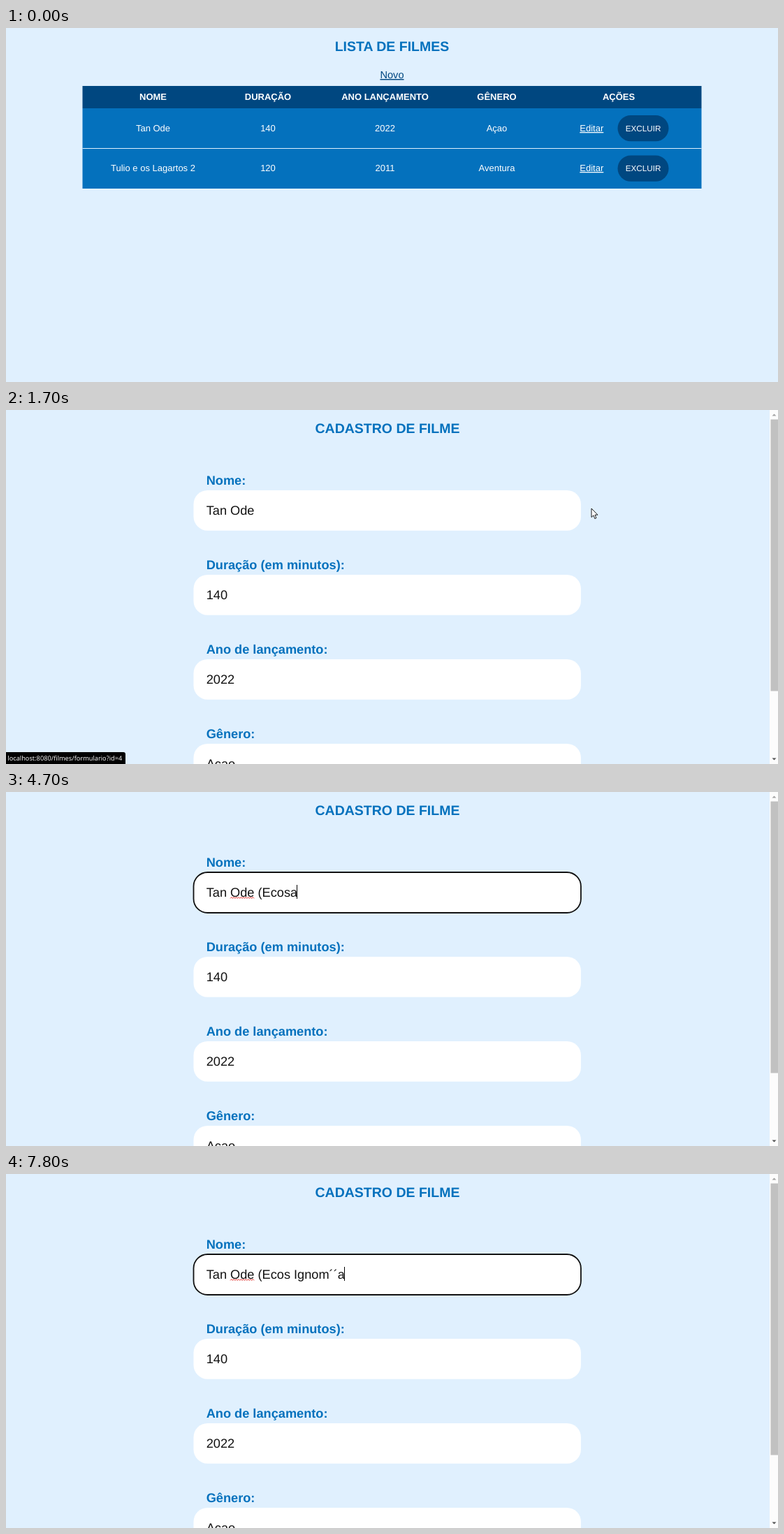
An HTML page that plays this animation: 1105x507 px, repeating every 8000 ms.

```html
<!DOCTYPE html>
<html lang="pt-BR">
<head>
<meta charset="utf-8">
<title>Lista de filmes</title>
<style>
  html, body { margin: 0; width: 100%; height: 100%; overflow: hidden; background: #e0f0fe; }
  svg { display: block; width: 1105px; height: 507px; }
  text { font: 13px "Liberation Sans", Arial, sans-serif; fill: #fff; white-space: pre; text-rendering: geometricPrecision; }
  .mid { text-anchor: middle; }
  .bold { font-weight: bold; }
  .title { font-size: 19.5px; fill: #0471bd; }
  .new { font-size: 14.6px; fill: #004780; }
  .link { text-decoration: underline; }
  .button { font-size: 11.7px; }
  .label { font-size: 18.2px; fill: #0471bd; }
  .value { font-size: 18.2px; fill: #111; }
  .status { font: 9.28px "Open Sans", "Noto Sans", sans-serif; }
  .squiggle { fill: none; stroke: #e5322d; stroke-width: 1; }
</style>
</head>
<body>
<svg id="stage" viewBox="0 0 1105 507">
  <rect width="1105" height="507" fill="#e0f0fe"/>
  <g id="list"></g>
  <g id="form"></g>
  <g id="status">
    <path d="M0 490H168Q171 490 171 493V507H0Z" fill="#000"/>
    <text id="url" class="status" x="2.3" y="502">localhost:8080/filmes/formulario?id=4</text>
  </g>
  <path id="arrow" d="M0 0V12.6L2.9 9.9 4.8 14.6 6.9 13.7 5 9.2H8.9Z" fill="#fff" stroke="#000" stroke-width=".9"/>
  <path id="beam" d="M0 0H2.2M3.2 0H5.4M2.7 .5V13M0 13.5H2.2M3.2 13.5H5.4" fill="none" stroke="#000"/>
</svg>
<script>
const LOOP = 8000;
const TEXT_X = 286.7;
const $ = id => document.getElementById(id);
const list = $("list"), form = $("form");

function add(parent, tag, attrs, content = "") {
  const node = document.createElementNS("http://www.w3.org/2000/svg", tag);
  for (const key in attrs) node.setAttribute(key, attrs[key]);
  node.textContent = content;
  return parent.appendChild(node);
}
const rect = (parent, x, y, width, height, fill, rx = 0) =>
  add(parent, "rect", { x, y, width, height, fill, rx });
const text = (parent, x, y, content, cls = "mid") =>
  add(parent, "text", { x, y, class: cls }, content);
const show = (node, visible) => node.style.display = visible ? "" : "none";

// Film list
const columns = [210.5, 375, 542.5, 702.5, 877];
text(list, 552.5, 33, "LISTA DE FILMES", "mid bold title");
text(list, 552.5, 72, "Novo", "mid new link");
rect(list, 109.5, 83, 886, 32, "#004780");
rect(list, 109.5, 115, 886, 115, "#0471bd");
rect(list, 109.5, 172, 886, 1, "#e0f0fe");
["NOME", "DURAÇÃO", "ANO LANÇAMENTO", "GÊNERO", "AÇÕES"]
  .forEach((name, i) => text(list, columns[i], 103, name, "mid bold"));
[
  ["Tan Ode", "140", "2022", "Açao"],
  ["Tulio e os Lagartos 2", "120", "2011", "Aventura"]
].forEach((cells, row) => {
  const y = 148 + row * 57;
  cells.forEach((cell, i) => text(list, columns[i], y, cell));
  text(list, 838.3, y, "Editar", "mid link");
  rect(list, 875.5, 125 + row * 57.5, 73, 37.3, "#004780", 18.6);
  text(list, 912, y, "EXCLUIR", "mid button");
});

// Film form
text(form, 546, 33, "CADASTRO DE FILME", "mid bold title");
const values = [
  ["Nome:", "Tan Ode"],
  ["Duração (em minutos):", "140"],
  ["Ano de lançamento:", "2022"],
  ["Gênero:", "Açao"]
].map(([label, value], i) => {
  const top = i * 121;
  text(form, TEXT_X, 107 + top, label, "bold label");
  rect(form, 268.5, 115 + top, 554.4, 57.7, "#fff", 20);
  return text(form, TEXT_X, 150 + top, value, "value");
});
const nameText = values[0];
const focus = add(form, "g", {});
add(focus, "rect", { x: 268.5, y: 115, width: 554.4, height: 58, rx: 20, fill: "none", stroke: "#111", "stroke-width": 1.8 });
const caret = rect(focus, 0, 133, 1, 20, "#000");
const squiggles = [0, 1].map(() => add(focus, "path", { class: "squiggle" }));

rect(form, 1093, 0, 12, 507, "#fcfcfc");
rect(form, 1094.5, 13.5, 10.5, 389, "#c1c1c1");
add(form, "path", { d: "M1096.5 8.5L1099.5 5.5 1102.5 8.5Z", fill: "#a3a3a3" });
add(form, "path", { d: "M1096.5 498.5L1099.5 501.5 1102.5 498.5Z", fill: "#505050" });

// Each step: start time, then its values
const pointer = [
  [0], [300, "arrow", 848, 6], [400, "arrow", 851, 130], [500, "arrow", 851, 195],
  [700, "arrow", 850, 188], [800, "arrow", 845, 164], [900, "arrow", 838, 141],
  [2100, "beam", 700, 142], [2200, "beam", 520, 140], [2300, "beam", 420, 138], [2500]
];
const status = [[0, 0], [700, .4], [800, .8], [900, 1], [1900, 0]];
const typing = [
  [0, ""], [3000, " "], [3400, " ("], [3900, " (E"], [4100, " (Ec"], [4200, " (Eco"],
  [4400, " (Ecos"], [4700, " (Ecosa"], [5200, " (Ecosa "], [5600, " (Ecosa"],
  [6200, " (Ecos"], [6400, " (Ecos "], [6700, " (Ecos I"], [6900, " (Ecos Ig"],
  [7100, " (Ecos Ign"], [7200, " (Ecos Igno"], [7300, " (Ecos Ignom"],
  [7700, " (Ecos Ignom´´"], [7800, " (Ecos Ignom´´a"]
];
const stepAt = (steps, time) => steps.findLast(step => step[0] <= time);

function underline(path, from, to) {
  const start = TEXT_X + nameText.getSubStringLength(0, from);
  const end = start + nameText.getSubStringLength(from, to - from);
  let d = "";
  for (let x = start, i = 0; x <= end; x += 1.7, i++) {
    d += `${i ? "L" : "M"}${x.toFixed(1)} ${i % 2 ? 150.6 : 152.4}`;
  }
  path.setAttribute("d", d);
}

function draw(now) {
  const time = now % LOOP;
  const editing = time >= 1700;
  show(list, !editing);
  show(form, editing);
  $("status").style.opacity = stepAt(status, time)[1];

  const [, shape, x, y] = stepAt(pointer, time);
  for (const id of ["arrow", "beam"]) {
    show($(id), id === shape);
    if (id === shape) $(id).setAttribute("transform", `translate(${x} ${y})`);
  }

  const focused = time >= 2500;
  show(focus, focused);
  const content = "Tan Ode" + stepAt(typing, time)[1];
  if (nameText.textContent !== content) nameText.textContent = content;
  if (focused) {
    caret.setAttribute("x", Math.floor(TEXT_X + nameText.getComputedTextLength() - .4));
    underline(squiggles[0], 4, 7);
    const misspelt = time >= 5300 && time < 5600;
    show(squiggles[1], misspelt);
    if (misspelt) underline(squiggles[1], 9, 14);
  }
}

function tick() {
  draw(performance.now());
  requestAnimationFrame(tick);
}
tick();
</script>
</body>
</html>
```
